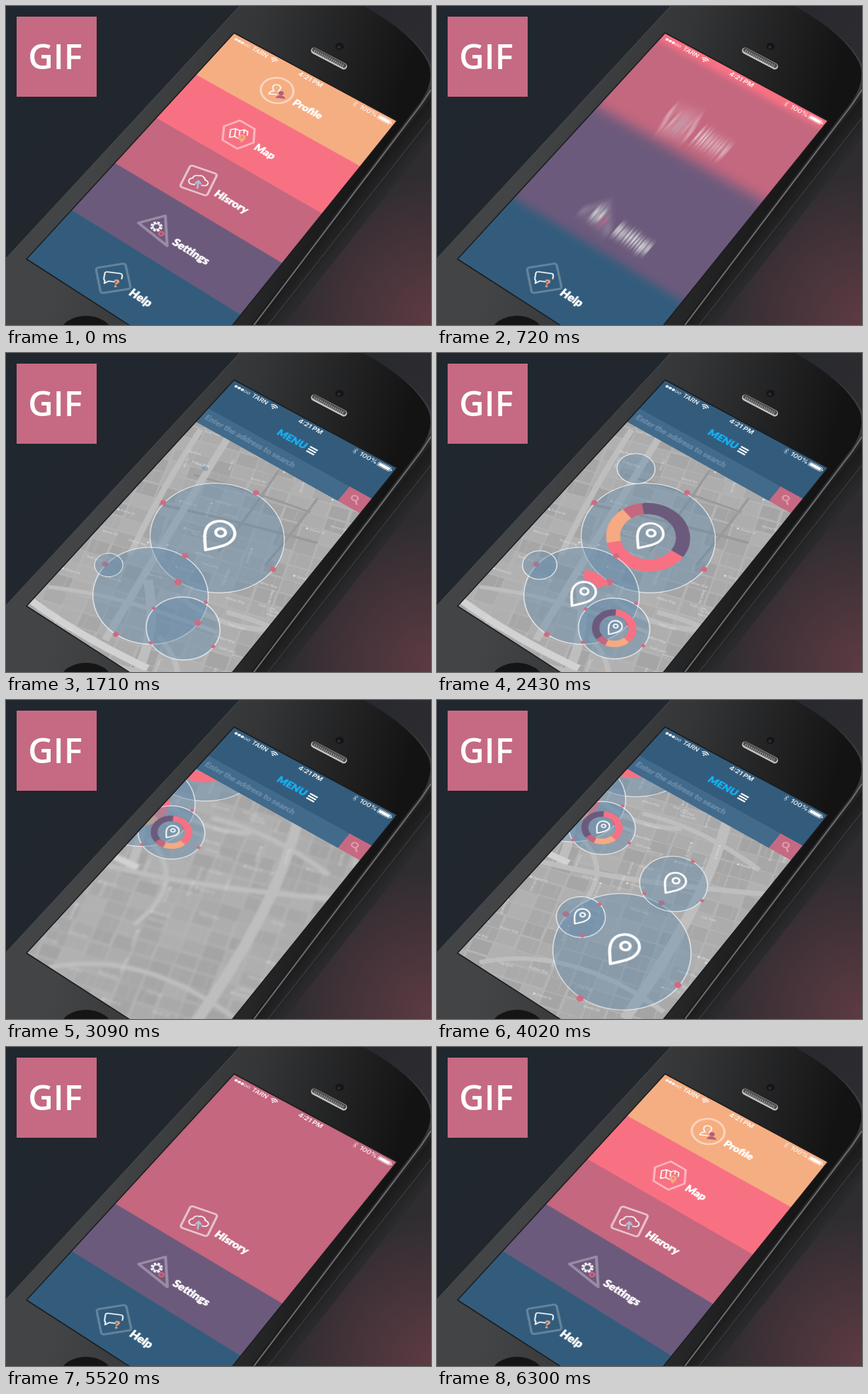
Recreate the animation shown at these times as an HTML page. Size 600x450 px, loop 6.66 s.

```html
<!DOCTYPE html>
<html lang="en">
<head>
<meta charset="utf-8">
<title>Phone menu and map</title>
<style>
  html, body { margin: 0; width: 100%; height: 100%; overflow: hidden; background: #24282d; }
  #stage { position: absolute; left: 0; top: 0; width: 600px; height: 450px; overflow: hidden; }
  #stage > svg { position: absolute; left: 0; top: 0; }
  #screen { transform-origin: 0 0; overflow: hidden; }
  .heavy { font-family: Lato, "Open Sans", sans-serif; font-weight: 900; fill: currentColor; stroke: currentColor; stroke-width: 0.6px; }
  .status { font: 500 12px Inter, "Liberation Sans", sans-serif; fill: #fff; }
  .line { fill: none; stroke: #fff; stroke-linecap: round; stroke-linejoin: round; }
</style>
</head>
<body>
<div id="stage">
  <svg width="600" height="450">
    <defs>
      <linearGradient id="desk" x1="0" y1="0" x2="1" y2="0.5">
        <stop offset="0" stop-color="#20272f"/><stop offset="0.45" stop-color="#22272d"/><stop offset="1" stop-color="#302d31"/>
      </linearGradient>
      <radialGradient id="glow" gradientUnits="userSpaceOnUse" cx="600" cy="440" r="200">
        <stop offset="0" stop-color="#70404a" stop-opacity="0.7"/><stop offset="1" stop-color="#70404a" stop-opacity="0"/>
      </radialGradient>
      <linearGradient id="body" gradientUnits="userSpaceOnUse" x1="120" y1="220" x2="500" y2="330">
        <stop offset="0" stop-color="#424446"/><stop offset="0.45" stop-color="#343536"/><stop offset="1" stop-color="#131314"/>
      </linearGradient>
      <linearGradient id="side" gradientUnits="userSpaceOnUse" x1="440" y1="310" x2="475" y2="338">
        <stop offset="0" stop-color="#3b3b3d"/><stop offset="0.3" stop-color="#1b1b1c"/><stop offset="1" stop-color="#2a292b"/>
      </linearGradient>
    </defs>
    <rect width="600" height="450" fill="url(#desk)"/>
    <rect width="600" height="450" fill="url(#glow)"/>
    <path d="M500 0Q580 40 600 82V187L392 450H300Z" fill="url(#side)"/>
    <path d="M600 158L370 450" stroke="#474549" stroke-width="1"/>
    <path d="M330 0H505Q577 40 596 80Q606 104 586 134L346 450H0V356Z" fill="url(#body)"/>
    <path d="M330 0L0 356" fill="none" stroke="#4c4f52" stroke-width="1"/>
    <path d="M600 118L586 139L350 450" fill="none" stroke="#6e6d70" stroke-width="2"/>
    <ellipse cx="471" cy="57" rx="6" ry="5" fill="#151518"/><circle cx="470" cy="58" r="2" fill="#2d3138"/>
    <path d="M435 63L477 85" stroke="#c6c6c6" stroke-width="9" stroke-linecap="round"/>
    <path d="M435.500 62L477 84" stroke="#4c4c4c" stroke-width="6.500" stroke-linecap="round"/>
    <path d="M435 63L477 85" stroke="#8c8c8c" stroke-width="4" stroke-dasharray="1.5 1.5"/>
    <ellipse cx="113" cy="463" rx="37" ry="26" fill="#151516"/>
  </svg>
  <svg id="screen" width="320" height="568"></svg>
  <svg width="600" height="450">
    <path id="bezel" fill="none" stroke="#1b1c1e" stroke-width="1.5"/>
    <rect x="15" y="15" width="113" height="113" fill="#c56a82"/>
    <text x="69.500" y="89" text-anchor="middle" fill="#fff" font-size="49" font-weight="600" font-family="'Open Sans', 'Noto Sans', sans-serif">GIF</text>
  </svg>
</div>
<script>
const LOOP = 6660, W = 320, H = 568, BAND = H / 5;
const screen = document.getElementById('screen');
const byId = id => document.getElementById(id);
const set = (id, name, value) => byId(id).setAttribute(name, value);
const clamp = v => Math.max(0, Math.min(1, v));
const easeInOut = p => (p = clamp(p)) < 0.5 ? 4 * p ** 3 : 1 - 4 * (1 - p) ** 3;
const easeOut = p => 1 - (1 - clamp(p)) ** 3;
const easeBack = p => (p = clamp(p) - 1, 1 + 2.7 * p ** 3 + 1.7 * p ** 2);

// Perspective from the flat screen to its four corners on the stage.
const corners = [[322, 38], [552, 162], [270, 512], [29, 357]];
const [[x0, y0], [x1, y1], [x2, y2], [x3, y3]] = corners;
const sx = x0 - x1 + x2 - x3, sy = y0 - y1 + y2 - y3;
const den = (x1 - x2) * (y3 - y2) - (x3 - x2) * (y1 - y2);
const g = (sx * (y3 - y2) - (x3 - x2) * sy) / den;
const h = ((x1 - x2) * sy - sx * (y1 - y2)) / den;
const a = x1 - x0 + g * x1, b = x3 - x0 + h * x3;
const d = y1 - y0 + g * y1, e = y3 - y0 + h * y3;
screen.style.transform = `matrix3d(${[a / W, d / W, 0, g / W, b / H, e / H, 0, h / H, 0, 0, 1, 0, x0, y0, 0, 1]})`;
set('bezel', 'd', `M${corners.join('L')}Z`);

// Stage point to flat screen point.
function at(x, y) {
  const p = a - g * x, q = b - h * x, r = d - g * y, s = e - h * y, k = p * s - q * r;
  return [((x - x0) * s - q * (y - y0)) / k * W, (p * (y - y0) - r * (x - x0)) / k * H];
}
const dragFrom = at(250, 388), dragTo = at(233, 180);
const drag = [dragTo[0] - dragFrom[0], dragTo[1] - dragFrom[1]];
const onMap = (x, y, dragged) => at(x, y).map((v, i) => v - (dragged ? drag[i] : 0));

let seed = 7;
const random = () => (seed = seed * 16807 % 2147483647) / 2147483647;

function mapGround() {
  let out = '<rect x="-300" y="-100" width="1100" height="1100" fill="#b4b4b4"/><g transform="rotate(-17)">';
  for (let y = 40; y < 980; y += 27) {
    for (let x = -250; x < 560; x += 34) {
      const tone = 164 + Math.floor(random() * 14);
      out += `<rect x="${x}" y="${y}" width="${29 + random() * 4}" height="${23 + random() * 3}" fill="rgb(${tone},${tone},${tone})"/>`;
      if (random() < 0.5) out += `<path d="M${x + 8 + random() * 16} ${y}v23" stroke="#b4b4b4" stroke-width="1"/>`;
    }
  }
  return out + '</g>';
}

function road(points, width, color, dragged) {
  const [p, q, r] = points.map(([x, y]) => onMap(x, y, dragged));
  return `<path d="M${p}Q${q} ${r}" fill="none" stroke="${color}" stroke-width="${width}"/>`;
}

function mapLabels() {
  const names = ['Dorvel St', 'Marrin Rd', 'Tesk Lane', 'Olvane St', 'Pellow Way', 'City Park'];
  let out = '<g font-family="Roboto, sans-serif" font-size="6" fill="#e2e2e2" opacity="0.85">';
  for (let i = 0; i < 110; i++) {
    const x = random() * 500, y = 110 + random() * 680, turn = random() < 0.7 ? -17 : 73;
    out += `<g transform="translate(${x} ${y}) rotate(${turn})"><text>${names[i % 6]}</text>${i % 3 ? '' : '<circle cx="-4" cy="-2" r="2"/>'}</g>`;
  }
  return out + '</g>';
}

const LIGHT = '#bebebe', DARK = '#999';
const roads = [
  road([[215, 213], [330, 238], [440, 268]], 5, DARK),
  road([[265, 172], [350, 195], [430, 225]], 4, DARK),
  road([[385, 165], [340, 235], [300, 280]], 4, DARK),
  road([[440, 205], [400, 260], [365, 300]], 4, DARK),
  road([[318, 112], [232, 250], [140, 405]], 12, LIGHT),
  road([[275, 108], [220, 190], [175, 285]], 10, LIGHT),
  road([[60, 330], [160, 340], [300, 395]], 7, LIGHT),
  road([[200, 320], [215, 390], [185, 450]], 15, LIGHT),
  road([[30, 345], [95, 395], [200, 445]], 12, '#d2d2d2'),
  road([[240, 340], [300, 390], [370, 390]], 9, LIGHT),
  road([[420, 120], [400, 260], [265, 450]], 17, LIGHT, true),
  road([[140, 226], [260, 258], [480, 275]], 10, LIGHT, true),
  road([[200, 190], [260, 250], [180, 310]], 8, LIGHT, true),
  road([[290, 160], [375, 180], [455, 240]], 9, LIGHT, true),
  road([[60, 370], [190, 345], [320, 440]], 8, LIGHT, true)
].join('');

const spots = [
  { x: 298, y: 259, r: 106, start: 1080, pin: 1.1, pinStart: 1250, ring: 1740, turn: 0, dots: [[353, 197, 5], [222, 211, 5], [377, 305, 5]] },
  { x: 204, y: 341, r: 89, start: 1240, pin: 0.9, pinStart: 2150, ring: 2290, ringSize: 0.42, dots: [[140, 298, 5], [253, 286, 5], [155, 397, 4.5], [243, 323, 6]] },
  { x: 250, y: 388, r: 54, start: 1380, pin: 0.48, pinStart: 1800, ring: 1950, dots: [[281, 353, 3], [270, 381, 5], [210, 361, 3], [206, 408, 3], [291, 413, 3]] },
  { x: 145, y: 299, r: 27, start: 1610 },
  { x: 281, y: 163, r: 31, start: 1694 },
  { x: 261, y: 353, r: 106, start: 3570, pin: 1.05, pinStart: 3680, dragged: true, dots: [[317, 286, 5], [182, 302, 5.5], [202, 421, 5.5], [340, 402, 5.5]] },
  { x: 334, y: 259, r: 53, start: 3650, pin: 0.75, pinStart: 3760, dragged: true, dots: [[361, 228, 3], [374, 283, 3], [293, 273, 3]] },
  { x: 203, y: 306, r: 36, start: 3720, pin: 0.5, pinStart: 3840, dragged: true, dots: [[228, 289, 3], [205, 331, 3]] }
];
const slices = [['#f87183', 0, 37], ['#f6a982', 37, 18], ['#c4677f', 55, 8], ['#6c5a7c', 63, 37]];

function spotMarkup(s, i) {
  const [cx, cy] = onMap(s.x, s.y, s.dragged);
  const { ringSize = 0.52, turn = -120 } = s;
  const dots = (s.dots || []).map(([x, y, r]) => {
    const [px, py] = onMap(x, y, s.dragged);
    return `<circle cx="${px - cx}" cy="${py - cy}" r="${r}" fill="#d4697f"/>`;
  }).join('');
  const ring = s.ring ? slices.map(([color], k) =>
    `<circle id="slice${i}${k}" r="${s.r * ringSize}" fill="none" stroke="${color}" stroke-width="${s.r * 0.21}" pathLength="100"/>`).join('') : '';
  const pin = s.pin ? `<g id="pin${i}" class="line" stroke-width="4.500"><path d="M0 29C-11 15-21 5-21-8A21 21 0 0 1 21-8C21 5 11 15 0 29Z"/><circle cy="-9" r="7"/></g>` : '';
  return `<g transform="translate(${cx} ${cy})"><g id="spot${i}">
    <circle r="${s.r}" fill="#6189a9" fill-opacity="0.43" stroke="#f4f6f8" stroke-width="1.3"/>${dots}</g>
    <g transform="rotate(${turn})">${ring}</g>${pin}</g>`;
}

const gear = `<circle r="8" stroke-dasharray="4.2 2.1" stroke-width="3" stroke-linecap="butt"/><circle r="5.500"/>`;
const items = [
  { label: 'Profile', color: '#f5ae82', open: 5900, tone: 0.5, frame: '<circle r="27"/>',
    glyph: '<path d="M-13 9Q-12 3-5 2Q-9-4-7-9Q-3-15 4-10Q7-5 2 2L5 4M-13 9H0"/><g fill="#b65c78" stroke="none"><circle cx="7" cy="5" r="4.5"/><path d="M-1 16Q0 10 7 10T15 16Z"/></g>' },
  { label: 'Map', color: '#f87183', open: 5530, tone: 0.5, frame: '<path d="M0-29L25-14V14L0 29L-25 14V-14Z" transform="rotate(-30)"/>',
    glyph: '<path d="M-14 8V-8L-6-11L1-8L8-11L14-8V0M-14 8L-6 5L0 8M-6-11V5M1-8V1M8-11V-4"/><path d="M6 16Q0 8 0 5A6 6 0 0 1 12 5Q12 8 6 16Z" fill="#f6a982" stroke="none"/><circle cx="6" cy="5" r="2" stroke="none" fill="#f87183"/>' },
  { label: 'Hisrory', color: '#c4677f', open: 5155, tone: 0.62, frame: '<rect x="-23" y="-23" width="46" height="46" rx="4" transform="rotate(-13)"/>',
    glyph: '<path d="M-5 9H-9A6 6 0 0 1-10-3A7 7 0 0 1-1-9A8 8 0 0 1 10-2A5.500 5.500 0 0 1 10 9H6"/><path d="M0 15V2M-4 6L0 1L4 6" stroke="#a9c3d6" stroke-width="3"/>' },
  { label: 'Settings', color: '#6c5a7c', open: 4780, tone: 0.3, frame: '<path d="M-29 9L-3-27L32 17Z" stroke-width="4.5"/>',
    glyph: `<g transform="translate(-1 -3)">${gear}</g><g transform="translate(8 9) scale(.55)" stroke="#e0607c" stroke-width="4">${gear}</g>` },
  { label: 'Help', color: '#335c7c', open: 4330, tone: 0.25, frame: '<rect x="-23" y="-23" width="46" height="46" rx="4" transform="rotate(-47)"/>',
    glyph: '<path d="M3 6H-6L-12 11V6Q-14 5-14 2V-7Q-14-10-10-10H9Q13-10 13-6V-1"/><text x="2" y="15" class="heavy" font-size="18" color="#f4a27c">?</text>' }
];

const header = `<g id="header">
  <text x="150" y="57" text-anchor="middle" class="heavy" font-size="18" color="#17aef2">MENU</text>
  <path d="M182 46H197M182 51.500H197M182 57H197" stroke="#fff" stroke-width="3"/>
  <rect y="78" width="320" height="36" fill="#426a8b"/>
  <text x="7" y="100" class="heavy" font-size="14.500" color="#6688a5">Enter the address to search</text>
  <rect x="278" y="78" width="42" height="36" fill="#c56a82"/>
  <g class="line" style="stroke:#e4a0b0" stroke-width="2.500"><circle cx="297" cy="93" r="5"/><path d="M301 97L306 102"/></g>
</g>`;

function panelMarkup(item, i) {
  return `<g id="panel${i}"><rect x="-5" y="-700" width="330" height="700" fill="${item.color}"/>
    <g id="entry${i}"><g class="line" transform="translate(128 62)">
      <g stroke-width="3.500" stroke-opacity="${item.tone}">${item.frame}</g>
      <g stroke-width="2" transform="rotate(-28)">${item.glyph}</g></g>
      <text x="163" y="72" class="heavy" font-size="18" color="#fff">${item.label}</text></g>
    ${i === 4 ? `<g transform="translate(0 ${-BAND})">${header}</g>` : ''}</g>`;
}

const signal = [0, 1, 2, 3, 4].map(i =>
  `<circle cx="${11 + i * 6.3}" cy="10" r="2.400" fill="${i < 3 ? '#fff' : 'none'}" stroke="#fff" stroke-width="0.800"/>`).join('');
const statusBar = `<g class="status">${signal}
  <text x="44" y="14.500" font-size="11.500">TARN</text>
  <g class="line" stroke-width="1.700" transform="translate(2.500 0)"><path d="M79 8.500Q85 3 91 8.500M81.500 11Q85 8 88.500 11"/><circle cx="85" cy="13.500" r="0.700"/></g>
  <text x="160" y="14.500" text-anchor="middle" font-weight="600">4:21 PM</text>
  <path class="line" opacity="0.6" stroke-width="1" d="M244 7L250 13L247 16V4L250 7L244 13"/>
  <text x="256" y="14.500">100%</text>
  <rect x="290.500" y="5.500" width="23" height="9" rx="1.500" fill="none" stroke="#fff" stroke-width="0.800"/>
  <rect x="292" y="7" width="20" height="6"/><rect x="314.500" y="8.500" width="1.500" height="3"/></g>`;

const filters = items.map((_, i) =>
  `<filter id="blur${i}" filterUnits="userSpaceOnUse" x="-5" y="-700" width="330" height="760"><feGaussianBlur/></filter>`).join('');
screen.innerHTML = `<defs>${filters}
  <filter id="blurMap" filterUnits="userSpaceOnUse" x="-20" y="80" width="560" height="760"><feGaussianBlur/></filter></defs>
  <g id="map"><g id="ground">${mapGround()}${roads}${mapLabels()}</g>${spots.map(spotMarkup).join('')}</g>
  ${items.map(panelMarkup).reverse().join('')}${statusBar}`;

function blur(id, filter, x, y) {
  if (x + y < 0.3) return byId(id).removeAttribute('filter');
  byId(filter).firstChild.setAttribute('stdDeviation', `${x} ${y}`);
  set(id, 'filter', `url(#${filter})`);
}

const openness = (i, t) => t < 2500
  ? 1 - easeInOut((t - 360 - 87 * i) / 400)
  : easeInOut((t - items[i].open) / 400);
const edge = (i, t) => {
  const rest = i === 4 ? BAND : -10;
  return rest + ((i + 1) * BAND - rest) * openness(i, t);
};
const scroll = t => easeOut((t - 2880) / 310);

function drawPanel(i, t) {
  const y = edge(i, t), speed = Math.abs(edge(i, t + 15) - edge(i, t - 15));
  set('panel' + i, 'transform', `translate(0 ${y})`);
  blur('panel' + i, 'blur' + i, 0, Math.min(12, speed * 0.3));
  const since = t - items[i].open - 400;
  const swing = i && since > 0 && t < 6300 ? 39 * Math.sin(since / 110) * Math.exp(-since / 250) : 0;
  const lift = i === 4 ? (H - y) * 0.22 : 0;
  set('entry' + i, 'transform', `translate(${swing} ${-BAND - lift})`);
  if (i === 4) {
    const open = openness(i, t);
    set('entry4', 'opacity', clamp(open * 5));
    set('header', 'opacity', clamp(1 - open * 2.5));
  }
}

function drawSpot(s, i, t) {
  set('spot' + i, 'transform', `scale(${Math.max(0, easeBack((t - s.start) / 400))})`);
  if (s.pin) {
    const shrink = s.ring ? 1 - easeInOut((t - s.ring) / 300) * (1 - s.r * 0.0089 / s.pin) : 1;
    const size = s.pin * easeBack((t - s.pinStart) / 300) * shrink;
    set('pin' + i, 'transform', `scale(${Math.max(0, size)})`);
  }
  if (s.ring) {
    const sweep = 100 * easeInOut((t - s.ring) / 410);
    slices.forEach(([, from, size], k) => {
      const length = Math.max(0, Math.min(size, sweep - from));
      set(`slice${i}${k}`, 'stroke-dasharray', `0 ${from} ${length} 200`);
      set(`slice${i}${k}`, 'visibility', length ? 'visible' : 'hidden');
    });
  }
}

function draw(t) {
  const p = scroll(t), speed = scroll(t + 15) - scroll(t - 15);
  set('map', 'transform', `translate(${drag[0] * p} ${drag[1] * p})`);
  blur('ground', 'blurMap', Math.abs(drag[0]) * speed * 0.3, Math.abs(drag[1]) * speed * 0.3);
  spots.forEach((s, i) => drawSpot(s, i, t));
  items.forEach((_, i) => drawPanel(i, t));
}

const began = performance.now();
function tick() {
  draw((performance.now() - began) % LOOP);
  requestAnimationFrame(tick);
}
tick();
</script>
</body>
</html>
```
